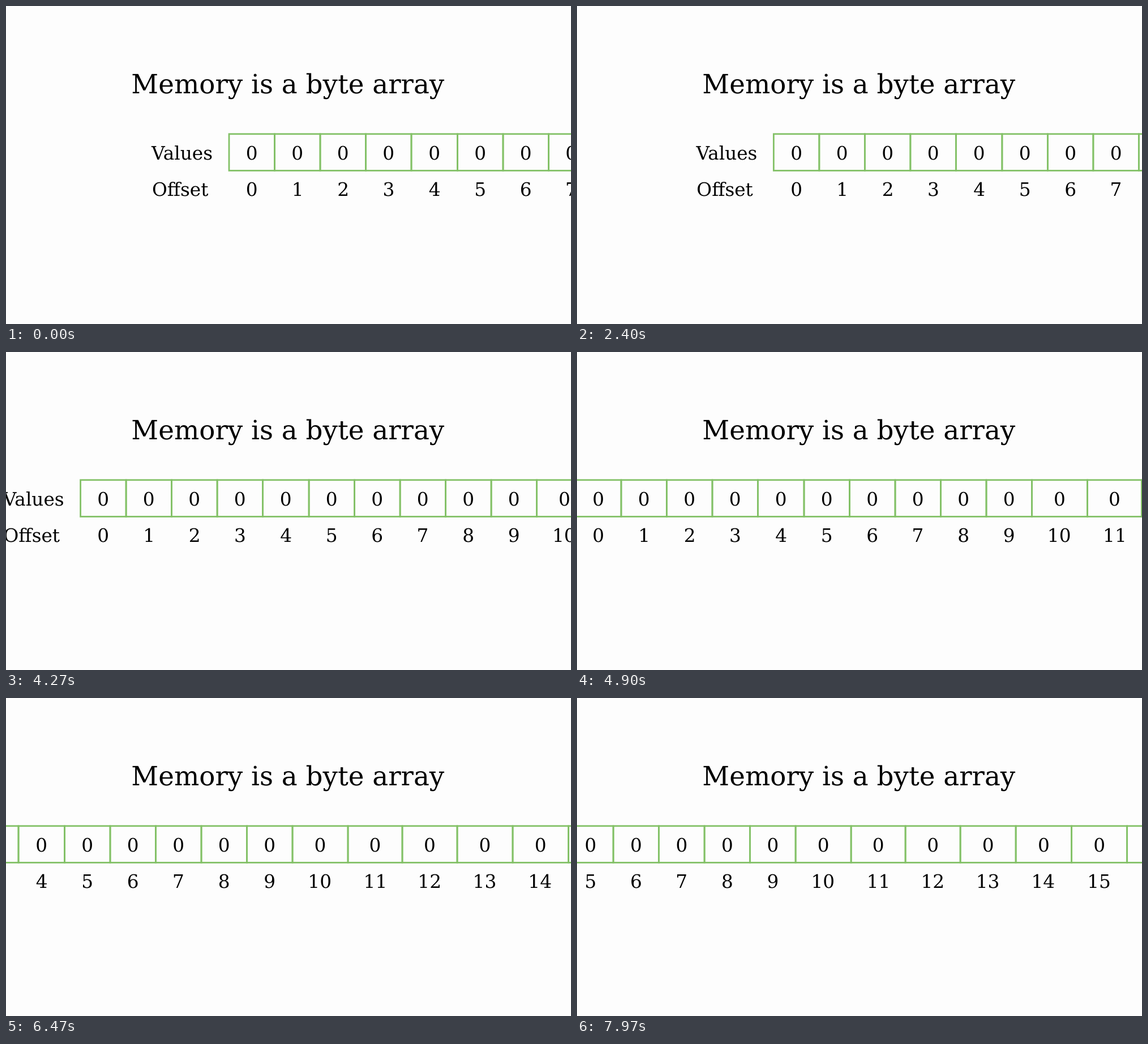
These frames come from a looping animation (998x561 px, 8 s). An HTML page:

```html
<!DOCTYPE html>
<html lang="en">
<head>
<meta charset="utf-8">
<title>Memory is a byte array</title>
<style>
  html, body { margin: 0; width: 100%; height: 100%; overflow: hidden; background: #fdfdfd; }
  svg { display: block; width: 998px; height: 561px; }
  text { font-family: "DejaVu Serif", serif; text-anchor: middle; text-rendering: geometricPrecision; }
  rect { fill: none; stroke: #83c167; stroke-width: 2.8; }

  /* Cubic ease-in-out over 10 s and 842 px, cut after 8 s. */
  #strip { animation: scroll 8s infinite; }
  @keyframes scroll {
    0% { transform: translateX(0); animation-timing-function: cubic-bezier(.33333, 0, .66667, 0); }
    62.5% { transform: translateX(-421px); animation-timing-function: cubic-bezier(.33333, .64103, .66667, .89744); }
    100% { transform: translateX(-815.06px); }
  }
</style>
</head>
<body>
<svg viewBox="0 0 998 561">
  <g id="title"></g>
  <g id="strip"></g>
</svg>
<script>
  const TITLE_SIZE = 46.78, LABEL_SIZE = 32.75;
  const VALUE_Y = 270.6, OFFSET_Y = 335;
  const CELL_TOP = 225.8, CELL_HEIGHT = 64.6;
  const WIDE_CELLS = [98, 96, 97, 98, 98.5, 98, 98];

  const title = document.getElementById('title');
  const strip = document.getElementById('strip');
  const ruler = document.createElement('canvas').getContext('2d');
  ruler.font = '1000px "DejaVu Serif", serif';
  ruler.textAlign = 'center';

  function add(parent, tag, attributes) {
    const node = document.createElementNS('http://www.w3.org/2000/svg', tag);
    for (const name in attributes) node.setAttribute(name, attributes[name]);
    return parent.appendChild(node);
  }

  // Centres the visible ink of the text, not its advance width.
  function addText(parent, content, center, y, size) {
    const ink = ruler.measureText(content);
    const shift = (ink.actualBoundingBoxLeft - ink.actualBoundingBoxRight) / 2;
    const x = center + shift * size / 1000;
    add(parent, 'text', { x, y, 'font-size': size }).textContent = content;
  }

  function cellWidth(index) {
    if (index >= 10) return WIDE_CELLS[index - 10];
    return index === 4 ? 81.5 : 80.5;
  }

  addText(title, 'Memory is a byte array', 498.8, 153.7, TITLE_SIZE);
  addText(strip, 'Values', 310.1, VALUE_Y, LABEL_SIZE);
  addText(strip, 'Offset', 308.5, OFFSET_Y, LABEL_SIZE);

  let x = 394;
  for (let i = 0; i < 17; i++) {
    const width = cellWidth(i);
    add(strip, 'rect', { x, y: CELL_TOP, width, height: CELL_HEIGHT });
    addText(strip, '0', x + width / 2, VALUE_Y, LABEL_SIZE);
    addText(strip, String(i), x + width / 2, OFFSET_Y, LABEL_SIZE);
    x += width;
  }
</script>
</body>
</html>
```
